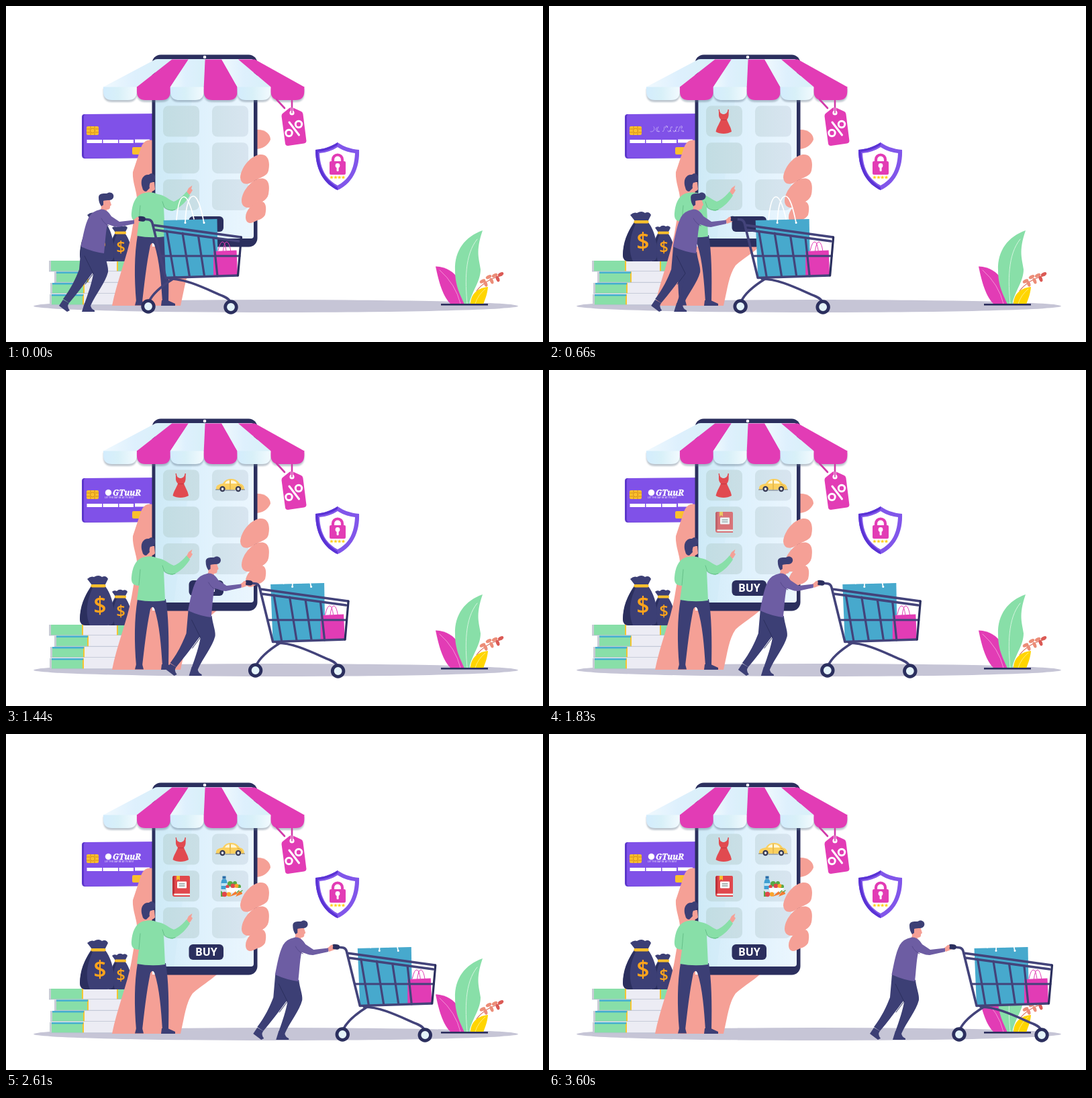
An HTML page that plays this animation: 800 px wide and 500 px high, repeating every 3.9 s.

```html
<!DOCTYPE html>
<html lang="en">
<head>
<meta charset="utf-8">
<title>Shopping cart</title>
<style>
html,body{margin:0;width:100%;height:100%;overflow:hidden;background:#fff}
svg{display:block;width:800px;height:500px}
text{font-family:"Open Sans",sans-serif;font-weight:700}
.ln{fill:none;stroke-linecap:round;stroke-linejoin:round}
.navy{fill:#2b2f5e}.ink{fill:#3c3f75}.pink{fill:#e23cb5}.skin{fill:#f5a096}
.green{fill:#88dfa8}.gold{fill:#fbc02d}.coin{fill:#ffa41c;text-anchor:middle;font-weight:600}
</style>
</head>
<body>
<svg viewBox="0 0 800 500">
<defs>
  <linearGradient id="screen"><stop offset="0" stop-color="#d0ebf7"/><stop offset=".35" stop-color="#dcf0fc"/><stop offset="1" stop-color="#ebf6fe"/></linearGradient>
  <linearGradient id="cloth"><stop offset="0" stop-color="#f0f9fe"/><stop offset=".45" stop-color="#def0fd"/><stop offset="1" stop-color="#d8f0f8"/></linearGradient>
  <linearGradient id="hem"><stop offset="0" stop-color="#d3ecfd"/><stop offset=".45" stop-color="#d8f0f8"/><stop offset="1" stop-color="#f2fafe"/></linearGradient>
  <linearGradient id="tileL"><stop offset="0" stop-color="#c2dde3"/><stop offset="1" stop-color="#cadfe6"/></linearGradient>
  <linearGradient id="tileR"><stop offset="0" stop-color="#cfe2ea"/><stop offset="1" stop-color="#d8e5f0"/></linearGradient>
  <filter id="soft" x="-10%" y="-10%" width="120%" height="130%"><feGaussianBlur stdDeviation="1.3"/></filter>
  <clipPath id="wipe"><rect id="wipeBox" x="281" y="312" width="0" height="26"/></clipPath>
</defs>

<ellipse cx="402" cy="446.5" rx="361" ry="9.5" fill="#c6c5d6"/>

<!-- leaves -->
<g>
  <path class="pink" d="M640 387.500C656 388 668 396 675 408C682 420 684 431 685 444H663C651 433 645 412 640 387.500Z"/>
  <path class="ln" stroke="#f6a9de" stroke-width=".8" d="M646 393Q670 414 677 443"/>
  <path class="green" d="M710 334C684 343 668 364 669 393C669 416 676 428 683 444H690C694 424 707 410 707 392C705 376 699 366 710 334Z"/>
  <path class="ln" stroke="#d5f4df" stroke-width="1" d="M702 347C683 370 684 410 687 443"/>
  <path class="ln" stroke="#d9705f" stroke-width="1.2" d="M701 424Q714 407 739 401"/>
  <g id="twig" fill="#ec8d78"></g>
  <path fill="#ffd500" d="M692 444C692 432 699 420 718 418C717 430 713 438 711 444Z"/>
  <path class="ln" stroke="#fff0a0" stroke-width=".8" d="M714 421Q703 430 699 443"/>
  <rect x="648" y="443" width="70" height="2.6" class="navy"/>
</g>

<!-- shield -->
<g>
  <path fill="#8156ea" d="M494 203C483 210 473 213 461 214C461 239 470 263 494 274C518 263 527 239 526 214C514 213 504 210 494 203Z"/>
  <path fill="#5a33d5" d="M494 203C483 210 473 213 461 214C461 239 470 263 494 274L494 270C474 258 466 240 465 217Q482 215 494 207Z"/>
  <path fill="#fff" d="M494 210C486 215 478 218 467 219C468 240 475 257 494 267C513 257 519 240 520 219C510 218 502 215 494 210Z"/>
  <path class="ln" stroke="#e23cb5" stroke-width="4.2" d="M487 233V228.500A7 7 0 0 1 501 228.500V233"/>
  <rect class="pink" x="482" y="231" width="24" height="20" rx="2"/>
  <circle cx="494" cy="237.500" r="3.400" fill="#fff"/><rect x="492.600" y="238" width="3" height="8" rx="1" fill="#fff"/>
  <g id="stars" fill="#ffd21e"></g>
</g>

<!-- money -->
<g id="stacks"></g>
<path class="ink" d="M163 337L158 330Q161 327 165 329Q169 325 174 328Q179 326 181 330L177 338C184 347 188 360 187 375Q187 380 180 380H158Q151 380 152 372C153 359 157 347 163 337Z"/>
<path class="navy" d="M163 340C155 352 152 364 153 380H162C158 365 159 352 165 340Z"/>
<rect class="gold" x="162" y="335.500" width="17" height="4" rx="1.500"/>
<text class="coin" x="171" y="367" font-size="24">$</text>
<path class="ink" d="M128 320L121 311Q126 306 131 308Q138 304 143 308Q149 305 152 311L147 321C156 331 162 351 161 371Q161 380 151 380H119Q110 380 110 370C112 348 119 332 128 320Z"/>
<path class="navy" d="M128 322C116 336 110 353 110 371Q110 380 120 380H125C117 362 121 340 130 322Z"/>
<rect class="gold" x="126.500" y="319" width="22" height="4.600" rx="1.800"/>
<text class="coin" x="140" y="362" font-size="34">$</text>

<!-- bank card -->
<path fill="#5b36cb" d="M117 161H230V226L118 227Q113 227 113 222V165Q113 161 117 161Z"/>
<path fill="#8051e8" d="M119 161L230 160V226L119 226.500Q116 226 116 222V165Q116 161 119 161Z"/>
<rect class="gold" x="120" y="179" width="18" height="13" rx="2"/>
<path class="ln" stroke="#c98217" stroke-width=".8" d="M120 183H125M120 188H125M133 183H138M133 188H138M126 179V182M126 189V192M132 179V182M132 189V192"/>
<circle class="ln" cx="129" cy="185.500" r="3.500" stroke="#c98217" stroke-width=".8"/>
<path fill="#fff" d="M120.500 199H143V204H120.500ZM144.500 199H167V204H144.500ZM168.500 199H190V204H168.500ZM192 198.500H214V203.500H192Z"/>
<rect class="gold" x="188" y="210" width="20" height="11" rx="2"/>
<g id="label" fill="#fff" stroke="#fff" stroke-width=".4">
  <circle cx="152.500" cy="182.500" r="4.500"/>
  <text x="159" y="187" font-size="12" style="font-family:'Noto Serif',serif;font-style:italic">GTuuR</text>
  <text x="147" y="190.800" font-size="3.400" stroke-width="0" style="font-weight:400">LET THE DAY BE AT ITS BEST</text>
</g>

<!-- hand and phone -->
<path class="skin" d="M218 200C208 198 203 204 200 214L189 247C188 264 196 276 195 291L187 338C181 372 165 410 158 446H260C266 420 268 400 278 386C290 375 303 368 314 358H218Z"/>
<path class="skin" d="M372 184C387 183 394 191 394 199C390 208 381 213 372 213Z"/>
<rect x="217.500" y="72.500" width="157" height="286" rx="13" class="navy"/>
<rect x="222.500" y="79" width="146.500" height="267" rx="4" fill="url(#screen)"/>
<path d="M222.500 79H285L250 346H226Q222.500 346 222.500 342Z" fill="#c9e9f4" opacity=".3"/>
<circle cx="296" cy="76" r="2.300" fill="#fff"/>
<g id="tiles"></g>

<g id="dress">
  <path fill="#e14a50" d="M252.500 154H254C254 159 257 161 260 161C263 161 266 159 266.500 154H268C267 160 269 164 265 169C267 175 271 180 272 187C265 191 255 191 248.500 187C250 180 254 175 256 169C251 164 254 160 252.500 154Z"/>
  <path class="ln" stroke="#c2333f" stroke-width=".8" d="M256.500 169.500H264.500"/>
</g>
<g id="car">
  <path fill="#fbd05f" d="M313 177Q312 170 323 169C326 163 331 162 336 162C343 162 346 166 348 169C354 170 355 174 355 178H313Z"/>
  <path fill="#fff6d6" d="M326 169Q328 164.500 333 164.300V169ZM335 164.300Q342 164 344 169H335Z"/>
  <path class="ln" stroke="#c99a35" stroke-width=".8" d="M334 164V178M345 170Q350 171 351 175"/>
  <path class="ln" stroke="#777" stroke-width="1.200" d="M312.500 178H318M327 179H341M351 178H355.500"/>
  <g fill="#363a55"><circle cx="322.500" cy="177" r="4.200"/><circle cx="346" cy="177" r="4.200"/></g>
  <g fill="#e5e5e5"><circle cx="322.500" cy="177" r="1.900"/><circle cx="346" cy="177" r="1.900"/></g>
</g>
<g id="book">
  <path fill="#e0474c" d="M251 211H272Q274 211 274 213V242H251Q248 242 248 239V214Q248 211 251 211Z"/>
  <path fill="#f6f1ea" d="M251 237.500H274V240H251Q249.500 238.700 251 237.500Z"/>
  <path fill="#bd3038" d="M248 214Q248 211 251 211V237Q249 237 248 239Z"/>
  <path class="gold" d="M254 211H259V218L256.500 216L254 218Z"/>
  <rect x="255" y="219.500" width="14" height="10" rx="1" fill="#fff"/>
  <path class="ln" stroke="#566" stroke-width="1" d="M258 223H266M258 226H266"/>
</g>
<g id="food">
  <rect x="322.500" y="211.500" width="5" height="4" fill="#2b6ea8"/>
  <path fill="#3f9fd2" d="M322.500 216H327.500Q329.500 218 329.500 221V231H320.500V221Q320.500 218 322.500 216Z"/>
  <rect x="320.500" y="222" width="9" height="4" fill="#bfe5f4"/>
  <g fill="#57a845"><circle cx="334" cy="223" r="4"/><circle cx="341" cy="222" r="3"/><circle cx="347" cy="227" r="3"/></g>
  <g fill="#e0474c"><circle cx="338" cy="226" r="3.300"/><circle cx="330" cy="227" r="2.600"/></g>
  <circle cx="343.500" cy="226" r="3" fill="#fba52b"/>
  <path fill="#fff" d="M327 229H350L347 236H330Z"/>
  <path fill="#57a845" d="M320 233L326 239L324 242H320Z"/>
  <circle cx="325.500" cy="238.500" r="3.700" fill="#e0474c"/><circle cx="332" cy="238.500" r="3.200" fill="#fba52b"/>
  <path fill="#f37c32" d="M333 242L342 234L345 238ZM342 242L347 234Q352 234 352 238Z"/>
  <path class="ln" stroke="#57a845" stroke-width="1.500" d="M344 236L347 233M349 235L352 233"/>
</g>

<rect x="272.500" y="313" width="51.500" height="23" rx="6" class="navy"/>
<g clip-path="url(#wipe)"><text x="298.300" y="330.300" font-size="16" text-anchor="middle" fill="#fff">BUY</text></g>

<g class="skin">
  <path d="M349 255C350 242 362 224 378 221C390 220 394 230 391 245C389 254 378 255 370 260C361 267 350 267 349 255Z"/>
  <path d="M351 290C351 278 362 262 376 257C390 254 394 264 391 280C389 290 378 293 370 297C361 303 351 300 351 290Z"/>
  <path d="M357 314C357 305 366 294 377 291C387 289 389 299 386 311C382 318 375 318 368 322C361 325 357 321 357 314Z"/>
</g>

<g id="awning"></g>

<!-- price tag -->
<path class="ln" stroke="#d13aa9" stroke-width="2.600" d="M403 139L415 152M426 141V158"/>
<path class="pink" d="M412 160L422 152Q425 150 429 152L440 157Q442 158 442.500 161L447.500 201Q447 204 444 204.500L420 208Q416.500 208 416 205L410.500 164Q410.500 161 412 160Z"/>
<circle cx="426" cy="159" r="3.600" fill="#fff"/>
<path class="ln" stroke="#fff" stroke-width="3" d="M426 152V158"/><path class="ln" stroke="#d13aa9" stroke-width="1.600" d="M426 142V159"/>
<g class="ln" stroke="#fff" stroke-width="3"><circle cx="421.500" cy="189" r="4.700"/><circle cx="436" cy="176" r="4.700"/><path d="M422 173L436.500 192"/></g>

<!-- standing shopper -->
<g>
  <path class="skin" d="M208 262H221L222 273Q219 277 215 276L214 284H205Z"/>
  <path class="ink" d="M203 270C199 258 205 250 213 251C217 247 223 251 222 256Q221 263 215 263Q213 266 214 271L209 276Q204 276 203 270Z"/>
  <path class="skin" d="M268 279L272 271L277.500 267L276 272L278 274L275 279L271 283Z"/>
  <path class="ink" d="M196 341H238C242 365 243 400 242 440H233C231 410 229 380 221 355Q218 350 215 356C209 385 206 415 203 440H194C191 405 191 370 196 341Z"/>
  <path class="ink" d="M194 438H203L205 445.500H192ZM232 438H241L252 443V446H231Z"/>
  <path class="green" d="M203 279Q216 275 226 280C236 281 242 288 250 291C258 288 264 282 269 276L274 282C267 293 258 301 248 305C243 305 239 301 235 299L237 343Q216 346 195 342L198 321C190 321 186 317 187 308C188 296 192 283 203 279Z"/>
  <path class="ln" stroke="#66c089" stroke-width="1" d="M233 291L236 300Q244 306 252 303M198 320L200 297"/>
</g>

<!-- cart and pusher -->
<g id="mover">
  <path fill="#47a9cd" d="M234.500 319L314.500 317L316 402L238 404Z"/>
  <g class="ln" stroke="#fff" stroke-width="1.700"><path d="M254 318C256 295 260 284 265 284C271 284 276 300 280 317M267 322C268 296 273 283 279 283C286 283 291 303 295 323"/></g>
  <g fill="#fff"><circle cx="267" cy="322.500" r="1.500"/><circle cx="295" cy="322.500" r="1.500"/></g>
  <path class="pink" d="M309 365L343.500 363.500L345 400L309 402Z"/>
  <path class="ln" stroke="#e23cb5" stroke-width="1" d="M316 364Q319 350 323 351Q326 351 328 364M323 367Q325 350 329 351Q333 352 335 366"/>
  <g class="ln" stroke="#43437a" stroke-width="3.200">
    <path d="M239.500 335L251 403M263 338L273.500 403M286.500 342L295.500 402M309 346L315 402M231 372H348"/>
    <path stroke-width="3.600" d="M221 333L347 350M219 326L350 344M204 317L213 318Q217 319 218 323L238 404.500L345 401"/>
    <path stroke-width="3.600" d="M249 406Q220 424 213 440M244 406C270 406 300 422 324 432Q333 436 335 442"/>
    <path stroke="#2b2f5e" d="M350.500 344L345.500 401"/>
  </g>
  <g fill="#e4f4fa" stroke="#2b2f5e" stroke-width="4.800"><circle cx="212" cy="447" r="8.300"/><circle cx="335" cy="448" r="8.300"/></g>
  <g class="ink">
    <path d="M112 357L140 365C139 380 134 392 126 401C115 416 105 429 94 442L85 436C96 422 104 405 109 392Z"/>
    <path d="M115 358L147 366C148 377 153 388 152 396C148 412 134 428 126 446L117 443C123 426 128 411 130 399L114 374Z"/>
    <path d="M85 437L94 442Q90 447 95 453L91 455L79 446Z"/>
    <path d="M117 442L126 445Q126 450 132 453V455H113Z"/>
  </g>
  <path class="ln" stroke="#2b2f5e" stroke-width="1" d="M117 372L130 398L118 414"/>
  <path class="skin" d="M140 287H154L157 296L155 298Q156 303 150 303L151 310L139 309L142 300Z"/>
  <path class="ink" d="M138 285C138 278 146 279 150 279C155 275 162 279 160 285C158 291 150 288 145 290L145 296L142 298Q138 293 138 285Z"/>
  <path class="skin" d="M189 319L196 314L202 316L200 321L192 324Z"/>
  <path fill="#6d5da3" d="M140 303C148 301 153 307 157 313L169 321L191 318.500V324L168 329C160 329 155 325 151 325C148 340 148 352 146 368Q129 366 111.500 358C115 342 117 327 123.500 314Q129 305 140 303Z"/>
  <path class="ln" stroke="#574a8c" stroke-width="1" d="M142 316Q146 324 153 327"/>
  <path class="ln" stroke="#2b2f5e" stroke-width="7.500" d="M200 316.500L204 317"/>
  <path class="skin" d="M191 318L195 314Q198 313 198 316L197 321L192 323Z"/>
</g>
</svg>
<script>
const byId = id => document.getElementById(id);
const fill = (id, parts) => byId(id).innerHTML = parts.join('');
const rect = (x, y, w, h, color) => `<rect x="${x}" y="${y}" width="${w}" height="${h}" fill="${color}"/>`;
const path = (d, color) => `<path d="${d}" fill="${color}"/>`;

fill('tiles', [0, 1, 2, 3, 4, 5].map(i => {
  const right = i % 2, row = i >> 1;
  return `<rect x="${right ? 307 : 234}" y="${148.5 + row * 54.7}" width="54" height="46" rx="8" fill="url(#tile${right ? 'R' : 'L'})"/>`;
}));

// striped cloth with rounded flaps
const stripes = [0, 1, 2, 3, 4, 5].map(i => {
  const x = 145 + i * 49.9, r = x + 49.9;
  return {
    pink: i % 2,
    low: `M${x} 120H${r}V127Q${r} 140 ${r - 13} 140H${x + 13}Q${x} 140 ${x} 127Z`,
    top: `M${222.5 + i * 24.7} 79.5H${247.2 + i * 24.7}L${r} 120.5H${x}Z`
  };
});
fill('awning', [
  `<path d="${stripes.map(s => s.low).join('')}" transform="translate(0 3)" fill="#62768a" opacity=".42" filter="url(#soft)"/>`,
  ...stripes.map(s => path(s.low, s.pink ? '#e23cb5' : 'url(#hem)') + path(s.top, s.pink ? '#e23cb5' : 'url(#cloth)'))
]);

// bundles of notes
const bundle = (x, y, edge) => [
  rect(x, y, 4, 16, '#c9ccd6'), rect(x + 3, y, 48, 16, '#88dfa8'),
  rect(x + 50, y, 52, 16, '#ececf4'), rect(x + 49, y, 2, 16, '#f5c531'),
  rect(x + 101, y, 2, 16, '#f5c531'), rect(x + 103, y, 18, 16, '#88dfa8'),
  rect(x + 3, y, 47, edge ? 2.5 : 0, '#45aed0'),
  rect(x, y + 15.3, 121, 1, '#b9bfd0')
].join('');
fill('stacks', [bundle(64, 379, 0), bundle(72, 395.5, 1), bundle(66, 412, 1), bundle(65, 429, 1)]);

fill('stars', [485, 491, 496.7, 502.5].map(x => {
  let d = '';
  for (let k = 0; k < 10; k++) {
    const r = k % 2 ? 1.3 : 3, a = k * Math.PI / 5;
    d += `${k ? 'L' : 'M'}${(x + r * Math.sin(a)).toFixed(2)} ${(255 - r * Math.cos(a)).toFixed(2)}`;
  }
  return `<path d="${d}Z"/>`;
}));

fill('twig', [0, 1, 2, 3, 4, 5, 6].map(i => {
  const side = i % 2 ? 1 : -1, u = i / 6;
  const x = 710 + u * 27, y = 414 - 12 * Math.sqrt(u) + side * 4.5 * (1 - u * .4);
  return `<ellipse cx="${x}" cy="${y}" rx="4.600" ry="2.500" transform="rotate(${side * 48 + 20} ${x} ${y})" ${i > 4 ? 'fill="#db5a55"' : ''}/>`;
}));

const LOOP = 3900, TRAVEL = 3600, STEP = 30;
const ramp = (t, from, to) => Math.min(1, Math.max(0, (t - from) / (to - from)));
const fades = { dress: [60, 630], car: [690, 1230], book: [1470, 1980], food: [1980, 2520] };

function draw(ms) {
  const t = Math.min(TRAVEL, Math.floor((ms % LOOP) / STEP) * STEP);
  byId('mover').setAttribute('transform', `translate(${(399 * t / TRAVEL).toFixed(2)} 0)`);
  for (const id in fades) byId(id).setAttribute('opacity', ramp(t, ...fades[id]));
  byId('wipeBox').setAttribute('width', 35 * ramp(t, 840, 1290));
  // card lettering: outlines grow, then fill in
  const ink = ramp(t, 300, 1290), label = byId('label');
  label.setAttribute('visibility', ink > 0 ? 'visible' : 'hidden');
  label.setAttribute('stroke-dasharray', ink < 1 ? `${24 * ink} ${24 * (1 - ink)}` : 'none');
  label.setAttribute('fill-opacity', ramp(t, 780, 1380));
}

const start = performance.now();
function tick() {
  draw(performance.now() - start);
  requestAnimationFrame(tick);
}
draw(0);
tick();
</script>
</body>
</html>
```
